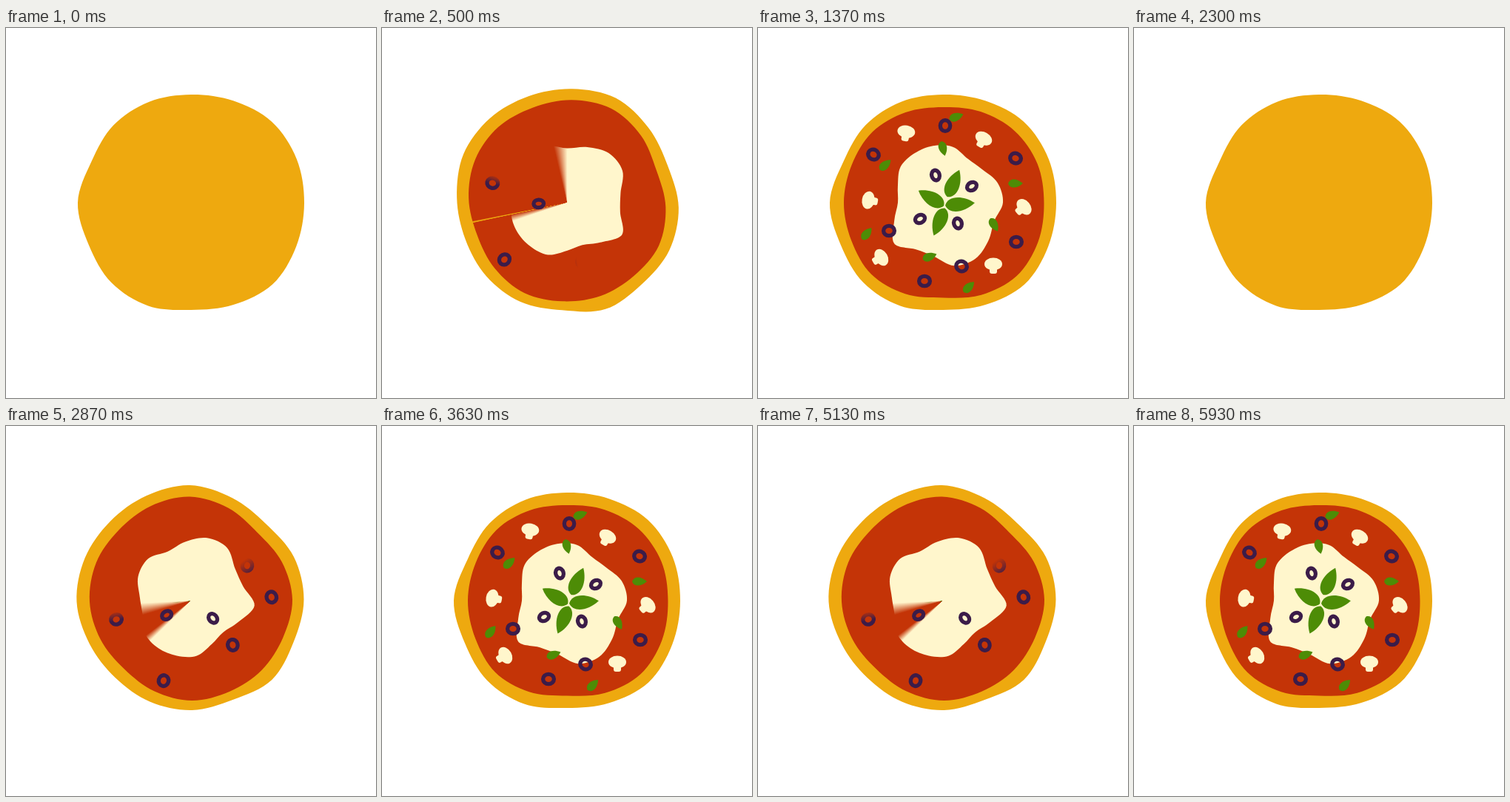
Animation, 500 px wide and 500 px high, one loop 6830 ms. Source, as an HTML page:

```html
<!DOCTYPE html>
<html lang="en">
<head>
<meta charset="utf-8">
<title>Pizza</title>
<style>
html, body { margin: 0; width: 100%; height: 100%; overflow: hidden; background: #fff; }
main { position: relative; width: 100%; height: 100%; overflow: clip; contain: strict; }
svg { position: absolute; left: 0; top: 0; width: 500px; height: 500px; }
</style>
</head>
<body>
<main></main>
<script>
const LOOP = 6830, BUILDS = [0, 2300, 4570], FPS = 30, WIPE = 400;
const CENTRE = [250, 236];
const DOUGH = '#eea90f', SAUCE = '#c43407', CREAM = '#fff6cc', GREEN = '#4d8c06', PURPLE = '#3b1c49';

// Smooth wobbly disc through radii at even angles, clockwise from the right
function blob(fill, ...radii) {
  const n = radii.length;
  const at = i => {
    const a = i / n * 2 * Math.PI, r = radii[(i + n) % n];
    return [CENTRE[0] + r * Math.cos(a), CENTRE[1] + r * Math.sin(a)];
  };
  let d = `M${at(0)}`;
  for (let i = 0; i < n; i++) {
    const [a, b, c, e] = [at(i - 1), at(i), at(i + 1), at(i + 2)];
    const p = b.map((q, j) => q + (c[j] - a[j]) / 6);
    const r = c.map((q, j) => q - (e[j] - b[j]) / 6);
    d += `C${p} ${r} ${c}`;
  }
  return `<path fill="${fill}" d="${d}Z"/>`;
}

// Copies of one shape at [x, y, turn]
const scatter = (shape, ...spots) => spots.map(([x, y, turn = 0]) =>
  `<g transform="translate(${x} ${y}) rotate(${turn})">${shape}</g>`).join('');

const ring = (rx, ry) =>
  `<ellipse rx="${rx}" ry="${ry}" fill="none" stroke="${PURPLE}" stroke-width="5.3"/>`;

const leaf = (length, width) => {
  const l = length / 2, w = width * .68;
  return `<path fill="${GREEN}" d="M${-l} 0C${-l * .8} ${-w} ${l * .2} ${-w} ${l} 0C${l * .2} ${w} ${-l * .8} ${w} ${-l} 0Z"/>`;
};

const mushroom = `<g fill="${CREAM}"><ellipse cy="-2" rx="12" ry="8.5"/><rect x="-5" width="10" height="11" rx="3"/></g>`;

const dough = blob(DOUGH, 153, 154, 156, 149.5, 145, 151, 152.5, 149.5, 153, 145.5, 148, 147.5, 146, 149, 154.5, 154.5);
const sauce = blob(SAUCE, 136.5, 139, 140.5, 135, 128.5, 133.5, 137, 134, 134, 133.5, 135, 132, 129, 133, 137, 138);
const cheese = blob(CREAM, 81, 73.5, 80, 87.5, 86.5, 73.5, 73, 86, 70, 61, 65, 75, 77, 78, 76.5, 68, 69.5, 78.5);

const olives =
  scatter(ring(7.4, 6.7), [156, 171, 30], [253, 132, 90], [348, 176, 20], [349, 289], [275, 322, 25], [225, 342], [177, 274]) +
  scatter(ring(6.8, 5.3), [240, 199, 75], [289, 214, -30], [270, 264, 75], [219, 258, -25]);
const mushrooms = scatter(mushroom, [200, 142, 10], [304, 151, 30], [358, 243, 50], [318, 321], [165, 311, 60], [151, 233, -80]);
const basil = scatter(leaf(40, 18.5), [264, 210, -66], [234, 230, -149], [245, 262, 112], [273, 238, -5]);
const herbs = scatter(leaf(20, 11), [268, 120, -20], [250, 163, 75], [172, 185, -42], [348, 210],
  [319, 266, 60], [232, 309, -20], [147, 278, -50], [285, 350, -45]);

const main = document.querySelector('main');

// A layer turns once between two times and is wiped in from the given time
function layer(art, from, to, wipe, [x, y] = CENTRE) {
  main.insertAdjacentHTML('beforeend', `<svg viewBox="0 0 500 500">${art}</svg>`);
  const { style } = main.lastElementChild;
  const pivot = `${x}px ${y}px`;
  style.transformOrigin = pivot;
  return t => {
    style.transform = `rotate(${-360 * ease((t - from) / (to - from))}deg)`;
    const shown = ease((t - wipe) / WIPE);
    const gap = 360 * (1 - shown), soft = Math.min(7, gap / 2);
    style.visibility = shown > 0 ? 'visible' : 'hidden';
    style.maskImage = shown < 1
      ? `conic-gradient(from 8deg at ${pivot}, transparent ${gap - soft}deg, #000 ${gap + soft}deg, #000 ${360 - soft}deg, transparent 360deg)`
      : 'none';
  };
}

function ease(x) {
  x = Math.min(1, Math.max(0, x));
  return x * x * (3 - 2 * x);
}

const layers = [
  layer(dough, 10, 1345, -WIPE),
  layer(sauce, 10, 1345, 110),
  layer(cheese, 10, 1345, 235),
  layer(olives, 172, 1272, 350),
  layer(mushrooms, 184, 1272, 520),
  layer(basil, 184, 1272, 520),
  layer(herbs, 280, 1265, 650, [248, 239])
];

const start = performance.now();
function tick() {
  const time = (performance.now() - start) % LOOP;
  const t = time - BUILDS.findLast(b => b <= time);
  const step = Math.floor((t + 10) * FPS / 1000);
  layers.forEach(draw => draw(step * 1000 / FPS));
  requestAnimationFrame(tick);
}
tick();
</script>
</body>
</html>
```
